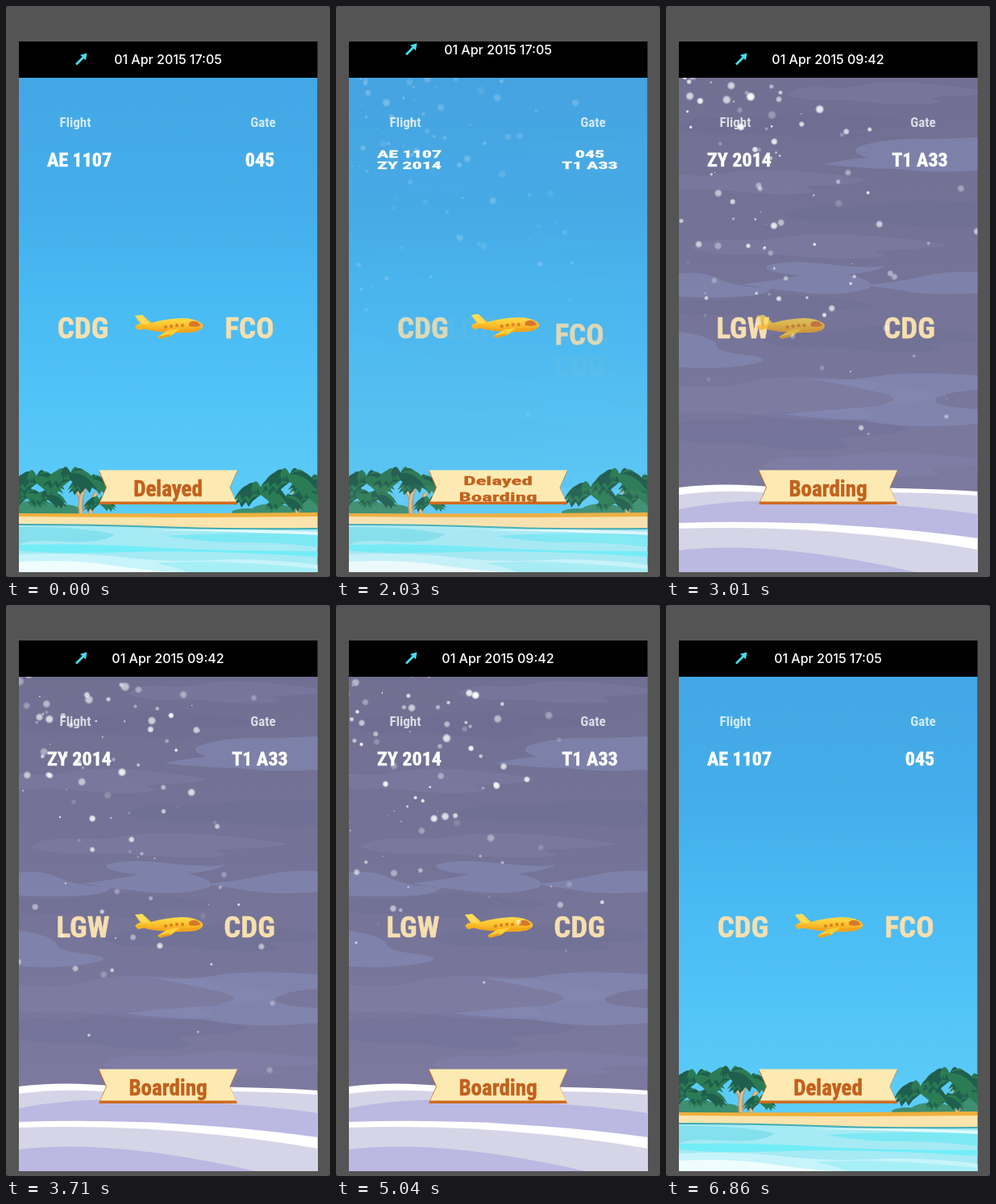
An HTML page for the animation above (6930 ms loop, 402 by 708 pixels).

```html
<!DOCTYPE html>
<html lang="en">
<head>
<meta charset="utf-8">
<title>Flight info</title>
<style>
  html, body { margin: 0; width: 100%; height: 100%; overflow: hidden; background: #545454; }
  svg { display: block; width: 100vw; height: 100vh; }
  text { text-anchor: middle; }
  .board {
    font-family: "Liberation Sans Narrow", "Roboto Condensed", "Open Sans Condensed", Roboto, "Liberation Sans", sans-serif;
    font-weight: 700; font-stretch: 75%;
  }
  .board text { stroke-width: .5; }
  .date { font: 500 16px Inter, Roboto, sans-serif; }
</style>
</head>
<body>
<svg viewBox="0 0 402 708">
  <defs>
    <linearGradient id="sky" x1="0" y1="0" x2="0" y2="1">
      <stop offset="0" stop-color="#43a7e5"/><stop offset=".3" stop-color="#44aeea"/>
      <stop offset=".5" stop-color="#48baf3"/><stop offset="1" stop-color="#5dcdf9"/>
    </linearGradient>
    <linearGradient id="dusk" x1="0" y1="0" x2="0" y2="1">
      <stop offset="0" stop-color="#716f92"/><stop offset=".5" stop-color="#767498"/><stop offset="1" stop-color="#807ca2"/>
    </linearGradient>
    <linearGradient id="gold" x1="0" y1="0" x2="0" y2="1">
      <stop offset="0" stop-color="#ffe45c"/><stop offset=".55" stop-color="#fcc62f"/><stop offset="1" stop-color="#ee9d1d"/>
    </linearGradient>
    <radialGradient id="flake">
      <stop offset="0" stop-color="#fff"/><stop offset=".55" stop-color="#fff" stop-opacity=".9"/>
      <stop offset="1" stop-color="#fff" stop-opacity="0"/>
    </radialGradient>
    <clipPath id="screen"><rect x="16" y="89" width="370.5" height="613"/></clipPath>
    <clipPath id="bar"><rect x="16" y="44" width="370.5" height="45"/></clipPath>
  </defs>

  <rect width="402" height="708" fill="#303030"/>
  <rect width="402" height="708" rx="4" fill="#545454"/>
  <rect x="16" y="44" width="370.5" height="658" fill="#000"/>

  <g clip-path="url(#bar)">
    <g id="summary">
      <path d="M86 71.5L94.5 63L92 60.8L100.5 58.5L99 67.5L96.5 65L88 73.5Z" fill="#48dbe9"/>
      <text id="date" class="date" x="201" y="72.2" fill="#fff"/>
    </g>
  </g>

  <g clip-path="url(#screen)">
    <g id="beach">
      <rect x="16" y="89" width="371" height="545" fill="url(#sky)"/>
      <g id="palms"/>
      <path d="M16 629Q200 630 387 628V655H16Z" fill="#efb03d"/>
      <path d="M16 633Q200 635 387 633V655H16Z" fill="#fbe4ad"/>
      <path d="M16 642Q110 642 190 645T387 647V702H16Z" fill="#42abb3"/>
      <path d="M16 644Q110 644 190 647T387 649V702H16Z" fill="#a5eaf4"/>
      <path d="M16 646Q90 645 135 655Q120 667 70 664T16 669Z" fill="#84e0ed"/>
      <path d="M180 650Q280 647 387 652V657Q300 651 180 650Z" fill="#e0f9fc"/>
      <path d="M198 657Q300 651 387 656V671Q340 664 268 665Q235 663 198 657Z" fill="#7ce8f3"/>
      <path d="M16 668Q100 666 180 671T387 676V683Q240 674 150 677T16 675Z" fill="#72edf7"/>
      <path d="M16 680Q90 677 150 684T280 686Q345 687 387 693V702H16Z" fill="#c6f4fa"/>
      <path d="M16 689Q80 686 128 693T210 702H16Z" fill="#effdfe"/>
      <path d="M185 691Q260 685 387 698V702H225Q210 695 185 691Z" fill="#a6eff7"/>
    </g>
    <g id="winter">
      <rect x="16" y="89" width="371" height="613" fill="url(#dusk)"/>
      <g id="bands"/>
      <g fill="#8a96c2" opacity=".45">
        <path d="M196 196Q225 190 250 188Q228 182 238 175Q270 163 330 165L387 163V204Q330 208 285 202Q240 202 196 196Z"/>
        <path d="M94 345Q140 340 165 334Q120 330 125 322Q150 314 200 320T272 322Q262 330 225 333Q262 341 252 350Q215 362 160 354Q120 350 94 345Z"/>
        <path d="M16 332Q45 328 65 338T131 350Q125 360 80 361T16 360Z"/>
        <path d="M248 346Q290 342 320 335T387 330V356Q330 360 295 353Q270 350 248 346Z"/>
        <path d="M16 404Q50 408 62 418Q60 428 95 432T118 441Q80 452 16 448Z"/>
        <path d="M180 462Q225 466 262 459T387 458V476Q352 478 335 486Q330 494 355 497T387 500V518Q300 526 245 514Q190 512 145 506Q210 500 262 496Q300 488 268 480Q225 470 180 462Z"/>
      </g>
      <path d="M16 597Q70 590 140 597Q290 596 387 602V702H16Z" fill="#fff"/>
      <path d="M16 606Q75 598 140 605Q280 600 387 607V702H16Z" fill="#d5d4e7"/>
      <path d="M16 624Q90 609 190 615Q300 617 387 630V702H16Z" fill="#bbb9e2"/>
      <path d="M16 641Q200 635 387 660V702H16Z" fill="#fff"/>
      <path d="M16 648Q200 642 387 674V702H16Z" fill="#d6d5e7"/>
      <path d="M16 675Q130 661 310 702H16Z" fill="#bbb9e2"/>
    </g>

    <g class="board">
      <g fill="#fff" opacity=".75">
        <text x="86" y="149.5" font-size="17">Flight</text>
        <text x="319" y="149.5" font-size="17">Gate</text>
      </g>
      <path d="M115 577H287L278 597L287 618H115L124 597Z" fill="#cf6b20"/>
      <path d="M115.5 575.5H287L277.5 597L285.5 614.5H117L125 597Z" fill="#fdeab2"/>
      <g id="labels"/>
    </g>

    <g id="plane">
      <path d="M-42 -14L-33 -15L-22 -5Q-5 -10 16 -11Q34 -11 42 -3Q44 3 33 6Q12 8 -8 6Q-24 5 -31 2L-42 0L-39 -3L-35 -4Z" fill="url(#gold)"/>
      <path d="M-30 1Q0 7 41 1Q35 7 18 7Q-12 8 -30 1Z" fill="#f1a51f"/>
      <path d="M-40 -13L-34 -14L-25 -4L-32 -4Z" fill="#ffdc55"/>
      <path d="M-42 0L-29 -2L-25 1L-38 4Z" fill="#f6b323"/>
      <path d="M14 2L3 11L-11 14.5L-14 12L-1 4Z" fill="#ffcf36"/>
      <path d="M3 11L-11 14.5L-14 12L1 9Z" fill="#eda01f"/>
      <path d="M25 -5Q30 -9 36 -6L40 -2Q35 1 25 -1Z" fill="#d8762b"/>
      <g fill="#d98423">
        <rect x="-6" y="-2" width="4" height="4" rx="1.5"/><rect x="1" y="-3" width="4" height="4" rx="1.5"/>
        <rect x="8" y="-4" width="4" height="4" rx="1.5"/><rect x="15" y="-4" width="4" height="4" rx="1.5"/>
      </g>
    </g>
    <g id="snow"/>
  </g>
</svg>
<script>
const $ = id => document.getElementById(id);
const LEG = 3465, LOOP = 2 * LEG, FIRST_CHANGE = 1865;
const flights = [
  { date: "01 Apr 2015 17:05", number: "AE 1107", gate: "045", from: "CDG", to: "FCO", status: "Delayed" },
  { date: "01 Apr 2015 09:42", number: "ZY 2014", gate: "T1 A33", from: "LGW", to: "CDG", status: "Boarding" }
];

const clamp = v => Math.min(1, Math.max(0, v));
const mix = (a, b, k) => a + (b - a) * k;
const span = (u, start, length) => clamp((u - start) / length);
const rand = (i, k) => { const v = Math.sin(i * 127.1 + k * 311.7) * 43758.5453; return v - Math.floor(v); };

// CSS-style timing curve with handles at (x1, 0) and (x2, 1)
const bezier = (x1, x2) => x => {
  if (x <= 0 || x >= 1) return clamp(x);
  let lo = 0, hi = 1, p = x;
  for (let i = 0; i < 20; i++) {
    p = (lo + hi) / 2;
    const bx = 3 * (1 - p) ** 2 * p * x1 + 3 * (1 - p) * p * p * x2 + p ** 3;
    if (bx < x) lo = p; else hi = p;
  }
  return 3 * p * p - 2 * p ** 3;
};
const easeInOut = bezier(.42, .58), easeIn = bezier(.42, 1), easeOut = bezier(0, .58);

function add(parent, tag, attrs) {
  const node = document.createElementNS("http://www.w3.org/2000/svg", tag);
  for (const key in attrs) node.setAttribute(key, attrs[key]);
  return parent.appendChild(node);
}

function trunk(x, y, lean) {
  const d = `M${x} ${y}Q${x + lean} ${y + 16} ${x + lean * .6} 629`;
  add($("palms"), "path", { d, fill: "none", stroke: "#b39c76", "stroke-width": 6 });
  add($("palms"), "path", { d, fill: "none", stroke: "#d8c196", "stroke-width": 3 });
}

// Drooping fronds around a crown, each with a notched lower edge
function fronds(x, y, size, dark, light) {
  const g = add($("palms"), "g", { transform: `translate(${x} ${y}) scale(${size})` });
  for (let i = 0; i < 11; i++) {
    const a = Math.PI * (.9 + i * .12);
    const dx = Math.cos(a) * 35, dy = Math.sin(a) * 13 + 15;
    add(g, "path", {
      d: `M0 -3Q${dx * .6} ${dy - 24} ${dx} ${dy}L${dx * .8} ${dy - 4}L${dx * .72} ${dy + 3}` +
         `L${dx * .55} ${dy - 4}L${dx * .45} ${dy + 2}L${dx * .3} ${dy - 5}L0 6Z`,
      fill: i % 3 === 1 ? light : dark
    });
  }
}

function bush(x, y, rx, ry, fill) { add($("palms"), "ellipse", { cx: x, cy: y, rx, ry, fill }); }

function band(x, y, w, h, fill) {
  const at = (u, v) => `${x + u * w} ${y + v * h}`;
  add($("bands"), "path", {
    d: `M${at(0, 0)}C${at(.08, -.7)} ${at(.22, -.15)} ${at(.35, -.45)}S${at(.75, -.6)} ${at(1, -.15)}` +
       `C${at(.9, .2)} ${at(.65, 0)} ${at(.74, .25)}S${at(.55, .55)} ${at(.4, .35)}S${at(.12, .5)} ${at(0, 0)}Z`,
    fill, opacity: .25
  });
}

function buildScenery() {
  const deep = "#1f5f4d", leaf = "#2b7c55", haze = "#3d8f70";
  [[36, 625, 30, 12], [72, 627, 22, 9], [300, 628, 20, 5], [330, 626, 26, 9], [372, 624, 24, 13]]
    .forEach(b => bush(...b, haze));
  [[84, 596, 14], [98, 596, -8], [112, 604, -10], [356, 598, 9]].forEach(t => trunk(...t));
  fronds(26, 606, .75, deep, leaf);
  fronds(52, 608, .7, leaf, deep);
  fronds(116, 614, .6, deep, leaf);
  fronds(104, 589, .8, deep, leaf);
  fronds(38, 586, 1, deep, leaf);
  fronds(80, 582, 1, leaf, deep);
  fronds(376, 606, .8, deep, leaf);
  fronds(346, 612, .7, leaf, deep);
  fronds(316, 600, 1, deep, leaf);
  fronds(378, 589, .8, leaf, deep);
  fronds(352, 584, 1.05, deep, leaf);

  [[16, 150, 300, 30], [150, 260, 330, 30], [0, 375, 260, 28], [120, 415, 290, 30], [0, 530, 300, 45]]
    .forEach(b => band(...b, "#666790"));
  [[150, 110, 250, 25], [-20, 220, 270, 28], [30, 300, 320, 28], [-40, 490, 390, 50], [120, 570, 290, 28]]
    .forEach(b => band(...b, "#8c88b2"));
}

function makePair(x, y, size, color) {
  return [0, 1].map(() => {
    const g = add($("labels"), "g", {});
    return { g, x, y, text: add(g, "text", { y: size * .36, "font-size": size, fill: color, stroke: color }) };
  });
}

function place(label, text, dx, dy, scaleY, opacity) {
  if (label.text.textContent !== text) label.text.textContent = text;
  label.g.setAttribute("transform", `translate(${label.x + dx} ${label.y + dy}) scale(1 ${scaleY})`);
  label.g.setAttribute("opacity", opacity);
}

// Old text folds away while the new one unfolds, like a turning cube
function cube([oldLabel, newLabel], before, after, offset, e) {
  const k = easeOut(e / 500);
  place(oldLabel, before, 0, -offset * k, mix(1, .1, k), e < 500 ? 1 : 0);
  place(newLabel, after, 0, offset * (1 - k), mix(.1, 1, k), 1);
}

function slide([oldLabel, newLabel], before, after, dx, dy, e) {
  const out = easeIn(e / 500), back = 1 - easeIn((e - 100) / 400);
  place(oldLabel, before, dx * out, dy * out, 1, 1 - out);
  place(newLabel, after, dx * back, dy * back, 1, 1 - back);
}

function drawPlane(e) {
  const u = easeInOut(e / 1500);
  let x, y = 398, angle = 0, alpha;
  if (u < .51) {
    const roll = span(u, 0, .25), climb = span(u, .25, .25);
    x = 202 + 79 * roll + 99 * climb;
    y -= 10 * roll + 49 * climb;
    angle = -22.5 * span(u, .1, .4);
    alpha = 1 - climb;
  } else {
    const arrive = span(u, .55, .45);
    x = mix(16, 202, arrive);
    alpha = arrive;
  }
  $("plane").setAttribute("transform", `translate(${x} ${y}) rotate(${angle})`);
  $("plane").setAttribute("opacity", alpha);
}

function drawSnow(t, strength) {
  $("snow").setAttribute("opacity", strength);
  if (strength <= 0) return;
  flakes.forEach((flake, i) => {
    const life = t / LEG + rand(i, 1), cycle = Math.floor(life) % 2;
    const age = (life - Math.floor(life)) * LEG / 1000;
    const r = k => rand(i, k + cycle * 10);
    const speed = 20 + (r(2) - .5) * 200, angle = Math.PI + (r(3) - .5) * Math.PI / 2;
    const x = 16 + (r(4) - .5) * 300 + Math.cos(angle) * speed * age + 5 * age * age;
    const y = 14 + (r(5) - .5) * 50 + Math.sin(angle) * speed * age + 35 * age * age;
    flake.setAttribute("cx", x);
    flake.setAttribute("cy", y);
    flake.setAttribute("r", Math.max(0, 4.3 * (1.6 * r(6) + .1 - .15 * age)));
    flake.setAttribute("opacity", clamp(1.3 - .75 * r(7) - .15 * age));
  });
}

function draw(t) {
  const sinceChange = (t - FIRST_CHANGE + LOOP) % LOOP;
  const leg = Math.floor(sinceChange / LEG), e = sinceChange % LEG;
  const before = flights[leg], after = flights[1 - leg], dir = leg ? -1 : 1;
  const toward = k => leg ? 1 - k : k;

  $("winter").setAttribute("opacity", toward(easeInOut(e / 1000)));
  drawSnow(t, toward(easeOut(e / 1000)));

  const u = easeInOut(e / 1000);
  $("summary").setAttribute("transform", `translate(0 ${-100 * (span(u, 0, .45) - span(u, .5, .45))})`);
  $("date").textContent = (e < 500 ? before : after).date;

  cube(number, before.number, after.number, dir * 15, e);
  cube(gate, before.gate, after.gate, dir * 15, e);
  cube(status, before.status, after.status, dir * 20, e);
  slide(departing, before.from, after.from, dir * 79, 0, e);
  slide(arriving, before.to, after.to, 0, dir * 49, e);
  drawPlane(e);
}

buildScenery();
const number = makePair(91, 190, 24, "#fff");
const gate = makePair(315, 190, 24, "#fff");
const departing = makePair(95.5, 399, 37, "#f6dfaf");
const arriving = makePair(302, 399, 37, "#f6dfaf");
const status = makePair(201, 598, 27, "#c2611d");
const flakes = Array.from({ length: 450 }, () => add($("snow"), "circle", { fill: "url(#flake)" }));

// A wider fallback face is set a little smaller
status[0].text.textContent = flights[0].status;
const shrink = Math.min(1, 88 / status[0].text.getComputedTextLength());
document.querySelectorAll(".board text").forEach(node =>
  node.setAttribute("font-size", node.getAttribute("font-size") * shrink));

const start = performance.now();
function tick(now) {
  draw(Math.max(0, now - start) % LOOP);
  requestAnimationFrame(tick);
}
draw(0);
requestAnimationFrame(tick);
</script>
</body>
</html>
```
